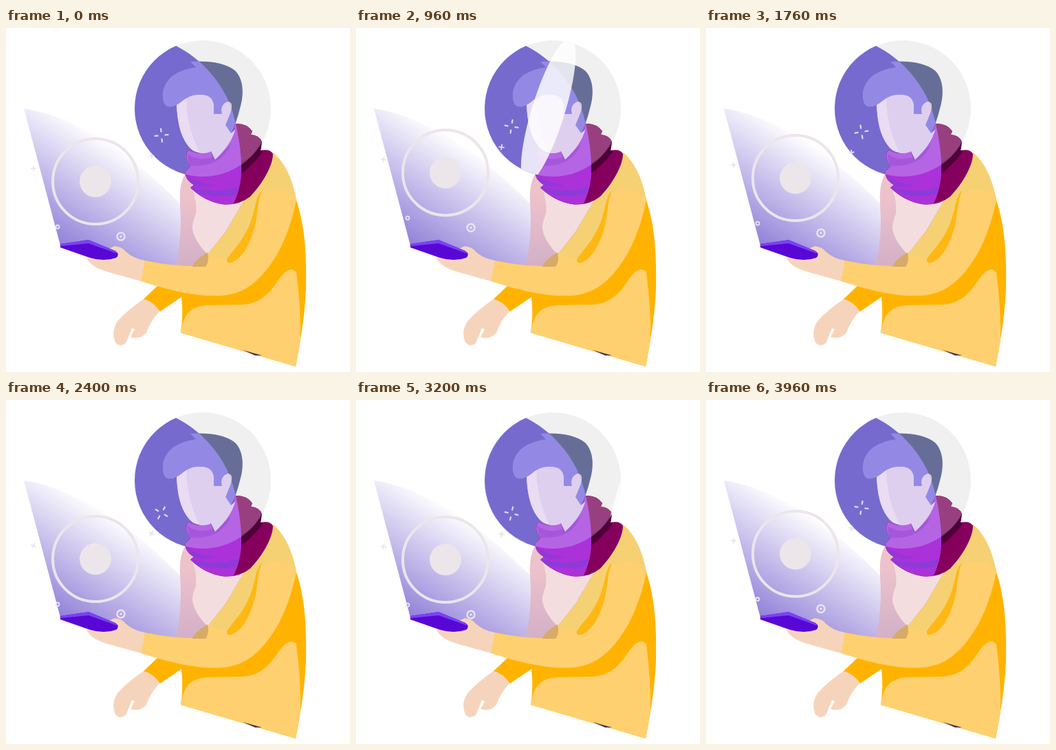
An HTML page with a canvas for the animation above (4 s loop, 500x500 px).

```html
<!DOCTYPE html>
<html lang="en">
<head>
<meta charset="utf-8">
<title>Helmet and hologram</title>
<style>
html, body { margin: 0; width: 100%; height: 100%; overflow: hidden; background: #fff; }
canvas { display: block; width: 100vw; height: 100vh; }
</style>
</head>
<body>
<canvas id="stage" width="500" height="500"></canvas>
<script>
const ctx = document.getElementById('stage').getContext('2d');
const LOOP = 4000;
const path = d => new Path2D(d);

const glass = new Path2D();
glass.arc(286, 117, 99, 0, Math.PI * 2);

const shape = {
  lens: path('M247 26C285 45 312 78 326 112C336 140 343 180 342 212C341 228 337 243 330 257L150 260V0Z'),
  beam: path('M26 117C62 122 92 136 128 155C170 178 210 212 256 258V347Q205 344 163 331L120 309L79 316Z'),

  hair: path('M230 110C224 95 230 78 244 68Q256 60 276 57L268 49C295 47 320 51 333 62C346 75 346 98 340 117Q335 138 327 153L316 143L320 125H302L302 112Q297 96 281 97C264 97 258 106 248 112Q235 118 230 110Z'),
  face: path('M248 112C258 106 264 97 281 97Q300 96 302 112V125L314 125C311 115 316 109 322 107C330 107 329 116 326 124L319 141L327 153L333 148Q327 170 304 191L298 179C287 185 277 181 270 176C256 164 250 140 248 112Z'),
  cheek: path('M248 112Q257 107 262 102C263 128 267 150 281 181Q270 180 263 169C253 155 249 136 248 112Z'),

  scarf: path('M265 177Q280 186 298 179L302 191Q327 172 333 139Q350 138 358 150L356 155Q369 156 372 166L370 178Q384 175 388 183C388 200 373 226 355 245Q337 259 313 256Q287 251 268 232L273 228Q259 220 261 208L268 201Q258 188 265 177Z'),
  gap: path('M371 164C365 180 350 194 337 198L336 216Q358 201 373 180Z'),
  foldA: path('M264 183C283 197 309 190 327 168C320 188 302 203 266 200Z'),
  foldB: path('M261 209C270 222 285 227 305 228Q288 233 270 228Z'),
  foldC: path('M269 231C290 238 315 239 338 231L335 241Q304 249 275 238Z'),

  shirt: path('M261 211C250 230 253 248 254 275Q254 318 246 345L292 348L350 245Z'),
  chest: path('M271 234L350 243L319 296L293 329Q274 310 271 292Q270 285 276 270Q278 253 271 234Z'),
  shade: path('M293 326C281 333 273 340 271 347H290Q296 339 293 326Z'),
  coat: path('M388 181C408 198 417 225 422 250C435 290 437 330 436 380C434 420 428 457 421 492L254 443Q258 419 255 391L224 412Q214 397 200 394L221 374L196 367L202 338Q249 348 291 346L293 329L320 296L347 249Q374 229 388 181Z'),
  arm: path('M388 181C408 198 417 225 422 250C415 285 402 320 385 343C365 372 342 388 311 389C272 391 231 379 196 368L202 338Q249 348 291 346L293 329L320 296L347 249Q374 229 388 181Z'),
  shoulder: path('M340 170H430V249H421Q410 234 390 234Q375 236 370 247C366 275 348 305 322 338Q310 334 293 329L320 296Z'),
  hem: path('M254 443C258 419 265 405 292 403L345 402C368 400 382 388 396 366Q412 343 422 355Q429 408 428 454L421 492Z'),
  crease: path('M372 236C362 246 363 265 354 286C343 312 330 322 321 336Q320 343 327 341C342 336 352 318 358 300C367 276 364 254 372 236Z'),
  underside: path('M344 468L372 476L362 476Z'),

  wrist: path('M147 322L158 317Q169 318 174 325Q185 335 202 338L196 368L146 354Q123 347 117 334L146 336Z'),
  hand: path('M200 394L216 392L226 409L222 413Q210 426 204 443Q194 454 181 449L187 438L183 436Q179 447 174 458Q166 465 159 457Q152 440 163 425Q179 408 200 394Z'),
  phone: path('M79 314L120 308L159 324Q166 329 160 334Q143 340 122 334L79 319Z'),
  phoneTop: path('M79 314L120 308L159 324L162 328L120 313L80 317Z')
};

function fill(p, color) {
  ctx.fillStyle = color;
  ctx.fill(p);
}

function clipped(paths, draw) {
  ctx.save();
  paths.forEach(p => ctx.clip(p));
  draw();
  ctx.restore();
}

function gradient(x0, y0, x1, y1, from, to) {
  const g = ctx.createLinearGradient(x0, y0, x1, y1);
  g.addColorStop(0, from);
  g.addColorStop(1, to);
  return g;
}

// Closed loop of [time, height] points shared by all floating parts
const drift = [[0, 223], [640, 214], [1150, 209.6], [1760, 218], [2400, 231], [2800, 233.3], [3200, 232]];

function floatY(t) {
  const n = drift.length;
  const at = k => {
    const turn = Math.floor(k / n), p = drift[k - turn * n];
    return [p[0] + turn * LOOP, p[1]];
  };
  let i = n - 1;
  while (drift[i][0] > t) i--;
  const [a, b, c, d] = [-1, 0, 1, 2].map(k => at(i + k));
  const span = c[0] - b[0], u = (t - b[0]) / span;
  const m0 = (c[1] - a[1]) / (c[0] - a[0]) * span;
  const m1 = (d[1] - b[1]) / (d[0] - b[0]) * span;
  const u2 = u * u, u3 = u2 * u;
  return (2 * u3 - 3 * u2 + 1) * b[1] + (u3 - 2 * u2 + u) * m0 +
    (3 * u2 - 2 * u3) * c[1] + (u3 - u2) * m1;
}

function ring(x, y, r, width, color) {
  ctx.beginPath();
  ctx.arc(x, y, r, 0, Math.PI * 2);
  ctx.lineWidth = width;
  ctx.strokeStyle = color;
  ctx.stroke();
}

function dot(x, y, r, color) {
  ctx.beginPath();
  ctx.arc(x, y, r, 0, Math.PI * 2);
  ctx.fillStyle = color;
  ctx.fill();
}

function sparkle(x, y, inner, outer, angle, width, color) {
  ctx.save();
  ctx.translate(x, y);
  ctx.rotate(angle);
  ctx.lineWidth = width;
  ctx.lineCap = 'round';
  ctx.strokeStyle = color;
  for (let i = 0; i < 4; i++) {
    ctx.beginPath();
    ctx.moveTo(inner, 0);
    ctx.lineTo(outer, 0);
    ctx.stroke();
    ctx.rotate(Math.PI / 2);
  }
  ctx.restore();
}

// Densest beside the phone, fading out towards the slanted upper edge
function drawBeam() {
  fill(shape.beam, gradient(-48, 233, 38, 98, 'rgba(88,62,196,.65)', 'rgba(88,62,196,.02)'));
}

function drawCoin(y, spin) {
  const pale = '#ece5ea';
  ring(130, y, 62, 4, pale);
  dot(130, y, 23, pale);
  ring(167, y + 80, 5.5, 2.5, '#e9e4f1');
  dot(167, y + 80, 1.7, '#e9e4f1');
  ring(75, y + 66, 2.5, 1.8, '#e9e4f1');
  sparkle(40, y - 19, 0.5, 3.5, spin, 1.5, '#e6e1eb');
}

function drawBody() {
  fill(shape.hand, '#f6d4bc');
  fill(shape.shirt, gradient(265, 245, 270, 345, '#edc2cb', '#d3b0c8'));
  fill(shape.chest, '#f4dddf');
  fill(shape.coat, '#ffb300');
  fill(shape.arm, '#ffd070');
  clipped([shape.arm], () => fill(shape.shoulder, '#f5d174'));
  fill(shape.hem, '#ffd070');
  fill(shape.crease, '#ffb713');
  fill(shape.shade, '#d6ab68');
  fill(shape.underside, '#50304c');
  fill(shape.wrist, '#f6d4bc');
  fill(shape.phone, '#5907d5');
  fill(shape.phoneTop, '#7744f5');
}

function drawScarf() {
  fill(shape.scarf, '#85005c');
  clipped([shape.scarf], () => {
    fill(shape.gap, '#4f0038');
    clipped([glass], () => {
      fill(shape.scarf, '#98407f');
      fill(shape.gap, '#733d68');
    });
    clipped([shape.lens], () => {
      fill(shape.scarf, '#ab31d9');
      fill(shape.foldB, '#9138d7');
      fill(shape.foldC, '#8b3bd8');
      clipped([glass], () => {
        fill(shape.scarf, '#b565e4');
        fill(shape.foldA, '#a557dc');
      });
    });
  });
}

function drawHead() {
  fill(shape.hair, '#666e98');
  fill(shape.face, '#d9c7c9');
  clipped([shape.lens], () => {
    fill(shape.hair, '#9389e5');
    fill(shape.face, '#decfef');
    fill(shape.cheek, '#e9dcf3');
  });
}

function drawShine(t) {
  const age = t < 2460 ? t - 600 : t - 2460;
  if (age < 0 || age > 820) return;
  const reach = 30 + 80 * Math.min(1, age / 240);
  clipped([glass], () => {
    ctx.beginPath();
    ctx.ellipse(163 + age * 0.323, 101 + age * 0.053, 24, reach, 0.3, 0, Math.PI * 2);
    ctx.fillStyle = 'rgba(255,255,255,.82)';
    ctx.fill();
  });
}

function draw(t) {
  const y = floatY(t);
  const spin = -0.09 - t / 1000 * Math.PI * 2;
  ctx.fillStyle = '#fff';
  ctx.fillRect(0, 0, 500, 500);
  drawBeam();
  drawCoin(y, spin);
  drawBody();
  fill(glass, '#f0f0f0');
  clipped([glass], () => fill(shape.lens, '#776ace'));
  drawScarf();
  drawHead();
  sparkle(226, y - 67, 5.5, 9.5, spin, 2.3, '#dcd8f0');
  sparkle(211.5, y - 37, 0.5, 3.5, spin, 1.8, '#e5e1f0');
  drawShine(t);
}

function tick() {
  draw(performance.now() % LOOP);
  requestAnimationFrame(tick);
}
tick();
</script>
</body>
</html>
```
